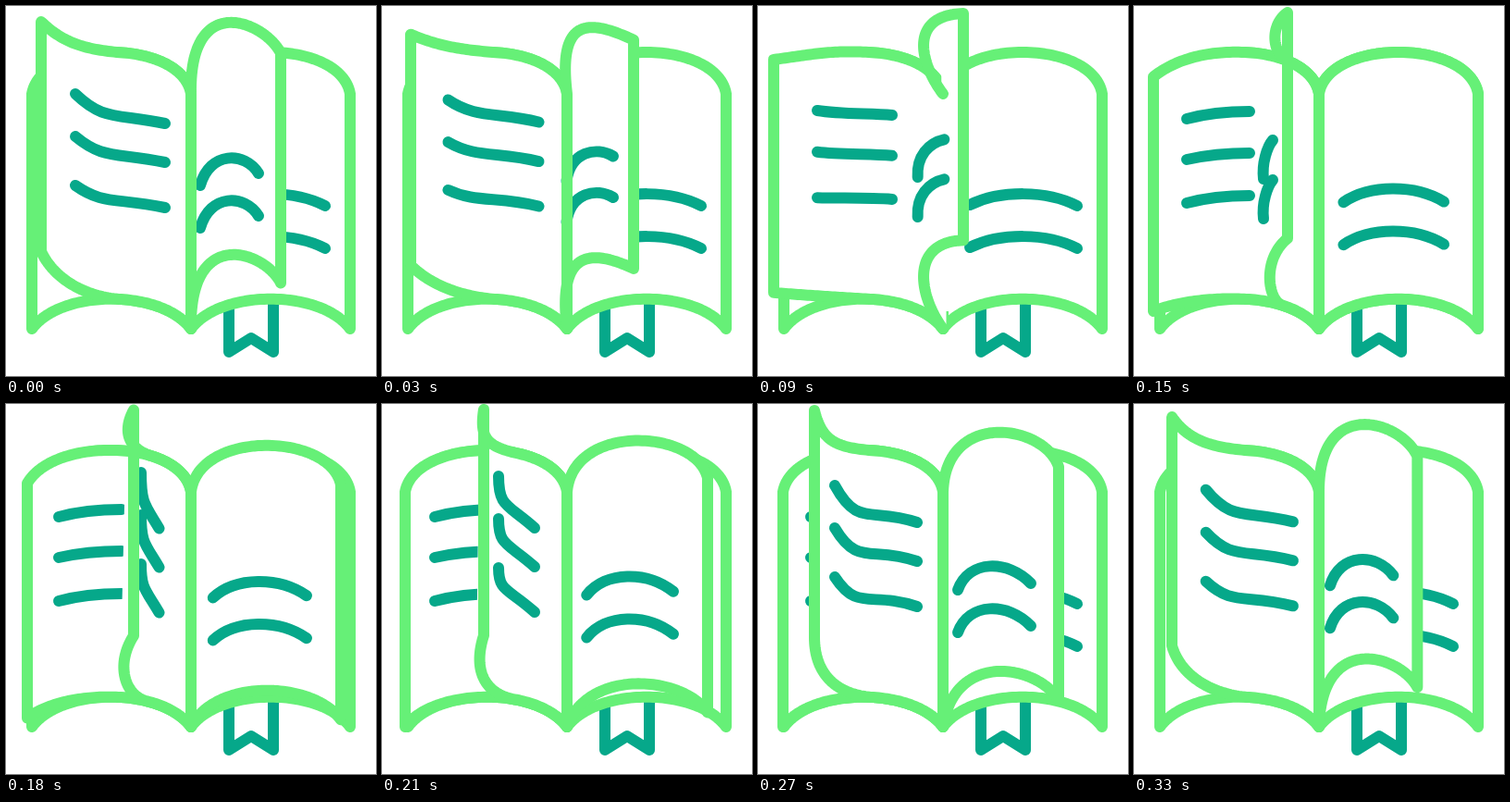
These frames come from a looping animation (400 px wide and 400 px high, 360 ms). An HTML page with a canvas:

```html
<!DOCTYPE html>
<html lang="en">
<head>
<meta charset="utf-8">
<title>Turning pages</title>
<style>
html, body { margin: 0; width: 100%; height: 100%; overflow: hidden; background: #fff; }
canvas { display: block; width: 400px; height: 400px; }
</style>
</head>
<body>
<canvas id="stage" width="400" height="400"></canvas>
<script>
const ctx = document.getElementById('stage').getContext('2d');
const GREEN = '#66f077', TEAL = '#06a88a', WHITE = '#fff';
const LOOP = 360, STEP = 30, BIRTH = 150;
const SPINE = 200, TOP = 95, BOTTOM = 349;

// Path of the outer top corner: age in ms, x, y.
const CORNER = [
  [0, 372, 95], [60, 352, 80], [120, 325, 68], [210, 297, 51],
  [300, 222, 8], [420, 110, 6], [480, 61, 7], [540, 41, 14],
  [570, 38, 17], [660, 17, 58], [780, 25, 95], [870, 28, 95]
];
// Curve handle at that corner.
const BEND = [
  [0, -10, -60], [210, -17, -34], [270, -82, -12], [300, -60, 2],
  [360, -20, 14], [420, -5, 32], [480, 8, 32], [570, 22, 21],
  [660, 43, -6], [780, 6, -33]
];
// Curve handle at the spine while the sheet rises.
const LIFT = [[0, 210, 35], [210, 198, -18], [270, 182, 43], [300, 175, 62]];

// First text line: age, start, end, then the handles at both ends.
const RECTO = [
  [-30, 229, 215, 345, 216, 33, -16, -33, -17],
  [120, 216, 201, 295, 194, 12, -33, -25, -26],
  [210, 210, 194, 273, 181, 10, -37, -15, -24],
  [270, 189, 184, 227, 144, -1, -26, -22, 2],
  [360, 140, 187, 150, 145, -2, -17, -6, 7]
];
const VERSO = [
  [360, 166, 70, 166, 135, 0, 34, -2, -26],
  [420, 126, 78, 165, 134, 0, 34, -29, -26],
  [480, 83, 88, 172, 128, 25, 46, -50, -17],
  [570, 75, 95, 172, 127, 30, 29, -54, -11],
  [630, 68, 108, 167, 124, 30, 12, -35, -11],
  [660, 64, 113, 145, 118, 24, 4, -25, -2],
  [720, 57, 122, 125, 114, 22, -6, -22, 0]
];

const mix = (a, b, k) => a + (b - a) * k;
const ramp = (v, a, b) => Math.min(1, Math.max(0, (v - a) / (b - a)));

function at(keys, age) {
  let i = 1;
  while (i < keys.length - 1 && keys[i][0] < age) i++;
  const a = keys[i - 1], b = keys[i], k = ramp(age, a[0], b[0]);
  return a.slice(1).map((v, n) => mix(v, b[n + 1], k));
}

function pointAt(c, u) {
  const v = 1 - u, w = [v * v * v, 3 * v * v * u, 3 * v * u * u, u * u * u];
  const sum = o => w.reduce((s, f, i) => s + f * c[2 * i + o], 0);
  return [sum(0), sum(1)];
}

const sample = (c, from, to, n) =>
  Array.from({ length: n + 1 }, (_, i) => pointAt(c, mix(from, to, i / n)));

function stroke(color, width, cap, draw) {
  ctx.strokeStyle = color;
  ctx.lineWidth = width;
  ctx.lineCap = cap;
  ctx.beginPath();
  draw();
  ctx.stroke();
}

const trace = pts => pts.forEach(([x, y], i) => i ? ctx.lineTo(x, y) : ctx.moveTo(x, y));

// A rising rim is one cubic from the spine to the corner.
function risingRim(age, y0, corner, bend) {
  const [lx, ly] = at(LIFT, age), flat = y0 === TOP ? 0 : 1 - ramp(age, 0, 210);
  const [x, y] = corner;
  return sample([SPINE, y0, lx + 22 * flat, ly + y0 - TOP + 17 * flat,
    x + bend[0] - 22 * flat, y + bend[1] + 17 * flat, x, y], 0, 1, 60);
}

// A falling rim follows the resting arch, then leaves it for the corner.
function fallingRim(age, y0, corner, bend) {
  const isTop = y0 === TOP, k = ramp(age, 360, 480);
  const [inset, rise] = isTop ? [10, 60] : [32, 43];
  const arch = [SPINE, y0, SPINE - inset, y0 - rise, 28 + inset, y0 - rise, 28, y0];
  const leave = mix(0.27, 0.45, k), reach = mix(0.35, 1, k) * (1 - leave) / 3;
  const p = pointAt(arch, leave), q = pointAt(arch, leave + 0.001);
  const [ox, oy] = isTop ? [0, 0] : [mix(-8, 12, ramp(age, 660, 780)), 9];
  const rest = [
    ...p, ...p.map((v, i) => v + (q[i] - v) * 1000 * reach),
    corner[0] + bend[0] + ox, corner[1] + bend[1] + oy, ...corner
  ];
  return [...sample(arch, 0, leave, 30), ...sample(rest, 0, 1, 40)];
}

function textLines(age) {
  const verso = age >= 375;
  const [x0, y0, x1, y1, ax, ay, bx, by] = at(verso ? VERSO : RECTO, age);
  const late = ramp(age, 570, 720), near = mix(46, 43, ramp(age, 210, 270));
  const gaps = verso
    ? [[0, 0], [mix(46, 44, late), mix(42, 45, late)], [mix(99, 91, late), 91]]
    : [[0, 0], [near, near]];
  for (const [first, rest] of gaps) {
    stroke(TEAL, 12, 'round', () => {
      ctx.moveTo(x0, y0 + first);
      ctx.bezierCurveTo(x0 + ax, y0 + ay + rest, x1 + bx, y1 + by + rest, x1, y1 + rest);
    });
  }
}

function page(age) {
  const [x, y] = at(CORNER, age), bend = at(BEND, age);
  const height = 254 - 10 * Math.sin(Math.PI * ramp(age, 0, 780)) ** 2;
  const rim = age < 345 ? risingRim : fallingRim;
  const top = rim(age, TOP, [x, y], bend);
  const bottom = rim(age, BOTTOM, [x, y + height], bend);
  const folded = age > 250 && age < 325, upright = age > 240 && age < 400;

  if (folded) stroke(WHITE, 14, 'butt', () => trace([[SPINE, 110], [SPINE, 330]]));
  // The sheet is swept by uprights between its two rims.
  stroke(WHITE, 7, 'butt', () => top.forEach(([px, py], i) => {
    const from = upright && px < SPINE ? Math.max(py, TOP) : py;
    trace([[px, from], bottom[i]]);
  }));
  textLines(age);
  stroke(GREEN, 12, 'round', () => {
    trace([...top, [x, y + height]]);
    trace(bottom);
    if (!folded) trace([[SPINE, TOP], [SPINE, BOTTOM]]);
  });
}

function render(t) {
  ctx.fillStyle = WHITE;
  ctx.fillRect(0, 0, 400, 400);
  stroke(TEAL, 12, 'round', () =>
    trace([[241, 322], [241, 374], [265, 359], [289, 374], [289, 322]]));
  page(-30);
  page(870);
  [0, 1, 2]
    .map(n => t - BIRTH + n * LOOP)
    .filter(age => age >= 0 && age < 870)
    .sort((a, b) => Math.abs(b - 330) - Math.abs(a - 330))
    .forEach(page);
}

ctx.lineJoin = 'round';
const start = performance.now();
function tick() {
  const t = (performance.now() - start) % LOOP;
  render(Math.floor(t / STEP) * STEP);
  requestAnimationFrame(tick);
}
tick();
</script>
</body>
</html>
```
